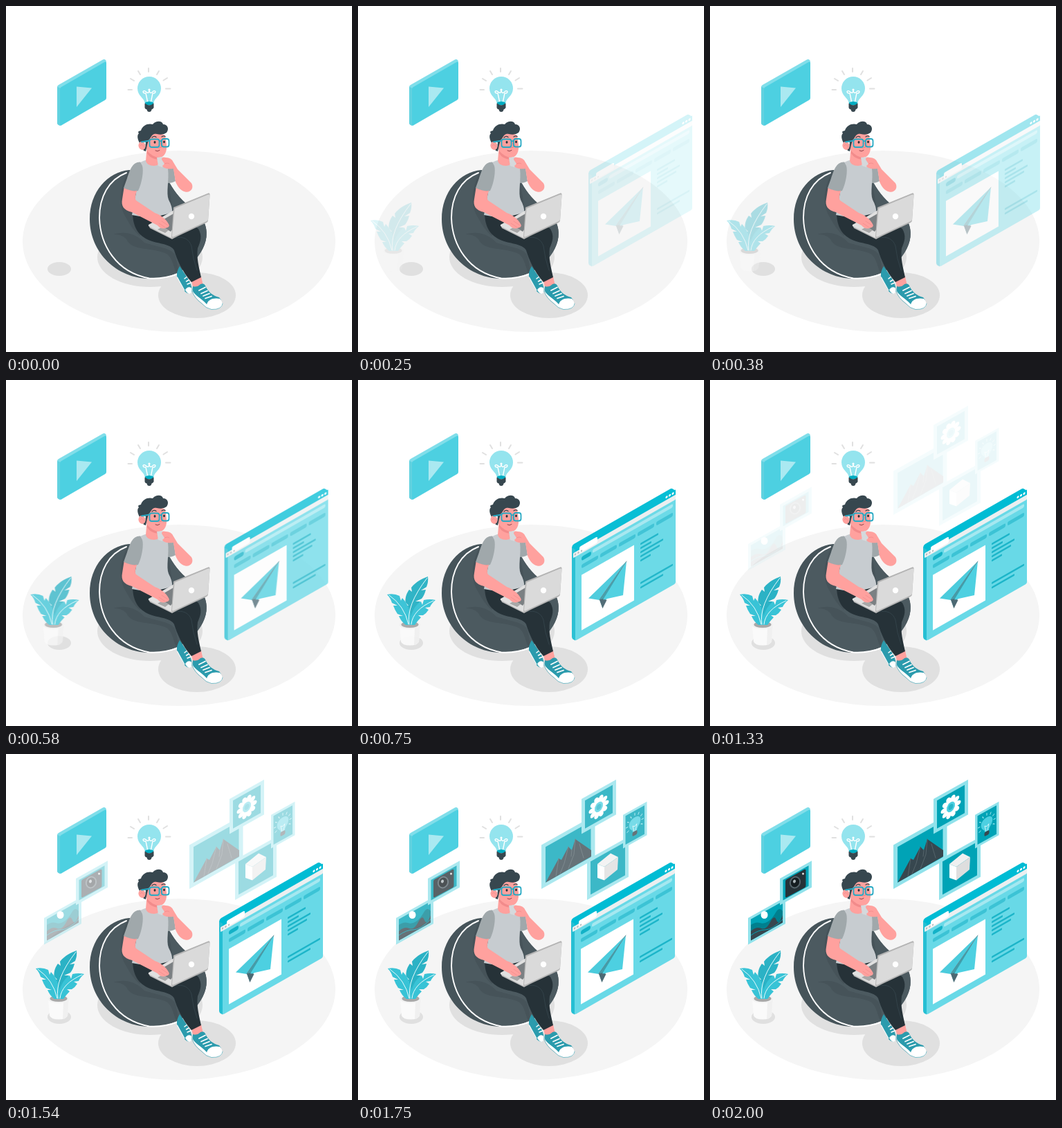
Recreate the animation shown at these times as an HTML page with a canvas. Size 500x500 px, loop 2040 ms.

```html
<!DOCTYPE html>
<html lang="en">
<head>
<meta charset="utf-8">
<title>Idea</title>
<style>
html, body { margin: 0; width: 100%; height: 100%; overflow: hidden; background: #fff; }
canvas { display: block; width: 500px; height: 500px; }
</style>
</head>
<body>
<canvas id="stage"></canvas>
<script>
const SIZE = 500, LOOP = 2040, FPS = 24, ENTER = 1160, TRAVEL = 30;
const ratio = window.devicePixelRatio || 1;
const SLOPE = -0.572;
const teal = '#4dd0e1', dark = '#37474f', ink = '#263238', skin = '#ffa19e';
let g;

function prepare(canvas) {
  canvas.width = canvas.height = SIZE * ratio;
  const ctx = canvas.getContext('2d');
  ctx.scale(ratio, ratio);
  ctx.lineCap = ctx.lineJoin = 'round';
  return ctx;
}
function layer(draw) {
  const c = document.createElement('canvas');
  g = prepare(c);
  draw();
  return c;
}
function fill(color, d) {
  g.fillStyle = color;
  g.fill(new Path2D(d));
}
function line(color, width, d) {
  g.strokeStyle = color;
  g.lineWidth = width;
  g.stroke(new Path2D(d));
}
function oval(color, x, y, rx, ry = rx, turn = 0) {
  g.fillStyle = color;
  g.beginPath();
  g.ellipse(x, y, rx, ry, turn, 0, Math.PI * 2);
  g.fill();
}
function rect(color, x, y, w, h, r = 0) {
  g.fillStyle = color;
  g.beginPath();
  g.roundRect(x, y, w, h, r);
  g.fill();
}
// Draws in a plane leaning up to the right, with its corner at x, y.
function plane(x, y, draw, slope = SLOPE) {
  g.save();
  g.transform(1, slope, 0, 1, x, y);
  draw();
  g.restore();
}
function clipped(d, draw) {
  g.save();
  g.clip(new Path2D(d));
  draw();
  g.restore();
}

function floor() {
  oval('#f5f5f5', 250, 340, 226, 131);
  oval('#e0e0e0', 77, 380, 17, 10);
  oval('#e0e0e0', 208, 363, 76, 43);
  oval('#e0e0e0', 276, 418, 56, 33);
}

function video() {
  fill('#80deea', 'M74 117Q74 115 76 114L140 77.5Q142 76.5 144 78L145 80L79 173L76 172Q74 171 74 169Z');
  fill('#62d2e0', 'M74 117L78 118.500V173L76 172Q74 171 74 169Z');
  fill(teal, 'M78 120Q78 118 80 117L142.500 81Q145 79.500 145 82V133Q145 135 143 136L80 172.500Q78 173.500 78 171Z');
  fill('#aae9f1', 'M102 116.500L124 118.500L102 146Z');
}

function bulb() {
  line('#e0e0e0', 2, 'M176.500 121H182M180 105L185 108M191 94L194 99M206 90V95M221 94L218 99M233 104L227.500 107.500M231 119.500H237.500');
  fill('#94e4ee', 'M200.500 140C200 133 190 130 190 119A17 17 0 0 1 224 119C224 130 214 133 213.500 140Z');
  line('#fff', 1.4, 'M204.500 138L202 126C197 127 197 121 201 123C204 125 206 128 207 122C208 128 211 125 213 123C217 121 217 127 212 126L209.500 138');
  oval('#fff', 207, 121, 1.6);
  fill('#00acc1', 'M201 139.500Q207 136.500 213 139.500V143H201Z');
  fill(dark, 'M200.500 140.500Q207 146 213.500 140.500V147Q212 149 210.500 149.500Q210 153 207 153Q204 153 203.500 149.500Q201 149 200.500 147Z');
}

function seat() {
  fill('#46545a', 'M178 237C147 240 121 268 121 308C121 356 160 394 208 394C252 394 286 363 289.500 334C292 314 281 301 266 290C250 278 242 266 233 250Z');
  fill('#4c5a60', 'M178 238C152 248 135 275 135 307C136 345 158 388 213 394C254 393 286 363 289.500 334C292 314 281 301 266 290C250 278 242 266 233 250Z');
  fill('#465359', 'M176 240C165 262 161 285 173 305C181 320 188 328 193 332L242 300L234 252Z');
  fill('#465359', 'M155 330C172 324 190 330 200 342C222 349 238 350 244 359C247 368 249 378 249 387C243 388 243 365 232 358C210 348 182 355 174 337C169 331 162 330 155 330Z');
  line('#fff', 1.9, 'M174 241C148 251 135 276 135 306C136 345 159 385 207 393.500Q227 395 249 387');
}

function shoes() {
  fill('#2b9bad', 'M251 376L261 391Q268 400 269 412Q265 419 258 412L247 391Q246 384 251 376Z');
  fill('#fff', 'M259 410Q263 404 268 407.500Q270 415 265 416Q261 415 259 410Z');
  line('#fff', 1.1, 'M247.500 392L258 411');
  line('#fff', 1.5, 'M258 394L262 391M260.500 398L265 395.500M262 402L267 400');
  fill(skin, 'M268 397L282 391L285 404L271 409Z');
  fill('#fff', 'M269 411Q272 421 283 429Q289 437 297 438.500Q312 439 313 430L309 424Z');
  line('#2b9bad', .6, 'M269 412Q272 422 283 430Q289 437 297 438.500Q312 439 313 430');
  fill('#2b9bad', 'M270 405Q276 407 281 402Q286 400 288 404C292 413 299 419 308 421Q314 427 308 434Q298 438 290 431C282 422 272 418 269.500 411Z');
  fill('#fff', 'M290 432C291 424 300 421 309 423Q314 428 311 434Q304 438 295 436Z');
  line('#fff', 1.8, 'M279 411L288 406.500M282 415.500L291 411.500M285 419L294 415.500M288 422.500L297 419.500');
}

function legs() {
  fill(ink, 'M183 301C184 322 193 334 211 340C225 344 239 345 243 353C247 366 254 383 268 399L282 392C279 378 275 364 277 350C281 340 284 333 278 322L236 293Z');
  line('#37474f', .8, 'M243 335C256 332 265 337 268 347Q270 365 276 382');
}

function torso() {
  fill('#a0a8ab', 'M230 233L242 233L245 253Q240 256 233 256Z');
  fill('#c7ccd0', 'M194 226Q202 222 207 222Q216 231 226 230L234 235C236 252 231 270 235 280Q241 291 240 298Q212 309 182 302L189 264Z');
  fill('#a0a8ab', 'M194 225.500C183 225 179 237 175 249L170 263Q180 269 191 267C197 254 199 238 197 231Z');
}

function laptop() {
  fill('#bdbdbd', 'M206 317L208 321L240 337L280 314L278 302Z');
  fill('#e0e0e0', 'M206 318Q205 316 208 315L253 289Q256 287 259 289L288 304L240 334Q239 335 237 334Z');
  fill('#7b8083', 'M218 314L249 296L258 300L238 326Z');
  fill('#a8a8a8', 'M219 323L226 319L235 324L230 328Z');
  fill('#b3b3b3', 'M242 291L291 271Q295 269 294.500 273L292 310Q292 312 289 313.500L242 335.500L239 334Z');
  fill('#dadada', 'M243.500 294Q243.500 292.500 245 292L292 272.500Q294.500 272 294.500 274L292 308Q292 310 290 311L242 333.500Q239.800 334.500 240 332Z');
  oval('#fff', 268, 304, 4.2);
}

function nearArm() {
  fill(skin, 'M170.500 263Q180 268 189 267C187 273 186 278 188 281L215 299C222 301 231 307 235.500 316Q237 320 230 321Q224 323 219 317L182 298C170 295 166 289 168 279Z');
  line('#f28f8e', .8, 'M225 311L234 317M221 314L230 320');
}

function head() {
  fill(skin, 'M204 200L202 224Q204 231 214 231Q223 230 222 224L222 216Z');
  fill('#f28b8b', 'M204 209Q211 217 220 219L220 222Q209 221 204 213Z');
  fill(skin, 'M203 190Q218 180 230 187L232 200C233 211 229 218 222 219Q210 218 203 207Z');
  fill(dark, 'M202 210C197 209 198 207 201 205L202 197Q196 194 193 198C190 192 189 187 192 184Q189 181 195 180C197 172 206 169 212 171C217 165 226 166 227 171C234 171 236 178 232 183Q227 187 218 185C211 183 210 190 206 194L204 201Z');
  oval(skin, 196.500, 202, 5, 6, -.2);
  line('#f28b8b', .8, 'M194 202Q196 198 199 203');
  line(dark, 1.3, 'M211 190Q214 187 217 189.500M225 189Q228 187 230 188.500');
  oval(ink, 215, 196.800, 1.5, 1.9);
  oval(ink, 228.500, 196.300, 1.4, 1.9);
  line('#ef7f80', 1, 'M223 197L225 204L221 205');
  line('#8e4048', 1, 'M216 209Q219 211 222 208.500');
  g.strokeStyle = '#26a9c3';
  g.lineWidth = 1.8;
  g.beginPath();
  g.roundRect(207.500, 192.500, 14, 11.500, 3);
  g.roundRect(225, 192, 10.500, 11.500, 3);
  g.moveTo(196, 196.500);
  g.lineTo(207.500, 194.500);
  g.moveTo(221.500, 195.500);
  g.lineTo(225, 195);
  g.stroke();
}

function farArm() {
  fill('#d5d9dc', 'M218 219L226 218L230 225L226 233L220 231Z');
  fill(skin, 'M225 222Q225 217 231 219Q239 219 242 226L248 236L268 256C272 263 267 270 259 268.500C252 267 248 261 245 254L242 235C234 236 228 235 226 231L229 228Z');
  line('#f28b8b', .8, 'M229 228Q234 226 236 228');
}

function scenery() {
  floor();
  video();
  bulb();
  seat();
  shoes();
  legs();
  torso();
  laptop();
  nearArm();
  head();
  farArm();
}

function browser() {
  fill('#00bcd4', 'M308 242Q308 239 311 237L450 157.500Q452 156 454 157.500L458 160V166L313 248L308 246Z');
  fill('#26bfd3', 'M308 242L313 245V376.500L309.500 374.500Q308 373.500 308 371Z');
  plane(313, 241, () => {
    rect('#68d9e7', 0, 1, 145, 135, 2);
    rect('#00bcd4', 0, 0, 145, 8, 1);
    [132, 136.500, 141].forEach(x => oval('#fff', x, 3.700, 1.6));
    rect('#eceff0', -3, 7.500, 148, 7, 1);
    rect('#fff', 6, 3.500, 26, 9, 2);
    [0, 4.500, 9].forEach(x => oval('#b0b6b8', x, 11, 1.2));
    rect('#a5e8f0', 25, 18.500, 116, 5, 2);
    rect('#13b2c7', 9, 19.500, 14, 6, 2.5);
    for (let i = 0; i < 5; i++) rect('#3cc3d5', 9 + 27 * i, 31, 24, 5.500, 2);
    rect('#fff', 9, 46, 76, 80);
    [26, 16, 33, 28, 15].forEach((w, i) => rect('#1cb5c9', 94, 48.500 + 6 * i, w, 2.800, 1));
    rect('#1cb5c9', 94, 105, 47, 2.800, 1);
    rect('#1cb5c9', 94, 111.500, 33, 2.800, 1);
  });
  fill('#4bcbdc', 'M387 262L332 315.500L348 318Z');
  fill('#4dd0e1', 'M387 262L355 317L382 311Z');
  fill('#3f9fac', 'M387 262L348 317.500L352.500 330L355 317Z');
  fill('#4d6973', 'M348 317.500L352.500 330L358.500 318L354 316Z');
  fill('#4dd0e1', 'M387 262L353 317.500L358 317Z');
  line('#64747b', .7, 'M387 262L348 317.500');
}

function plant() {
  fill('#fafafa', 'M61 354L63 378Q65 383.500 76 383.500Q87 383.500 89 378L91.500 354Z');
  fill('#f0f0f0', 'M83 359L91 354L89 378Q87 382 82 383Z');
  oval('#f2f2f2', 76, 354, 15.300, 6);
  oval('#a8a8a8', 76, 353.500, 12.500, 4.600);
  fill('#2bb2c5', 'M73 354C70 341 69 333 69 326L74 326L69.500 321C69 313 72 307 75 303L79 306L78 300C85 291 94 287 102 284Q103 292 100 299L92 304L99 303Q97 311 93 316L84 320L91 320C83 331 80 339 81 354Z');
  fill('#38c3d6', 'M70 354C65 350 62 346 60 341L66 341L58 338Q54 332 52 326L58 326L50 322Q48 315 43 310Q53 308 61 312L63 319L65 315C74 324 79 339 79 354Z');
  fill('#38c3d6', 'M76 354C76 338 83 325 92 320L94 325L96 318Q105 316 113 318Q107 323 105 328L98 329L103 332Q100 337 95 340L88 340L92 343Q87 348 83 354Z');
  line('#e6fafc', 1, 'M75 353Q70 326 101 286M74 353Q68 326 46 311M78 353Q80 332 110 319');
}

// A framed picture; draw gets the frame's own leaning axes.
function card(x, y, w, h, edge, draw) {
  plane(x, y, () => {
    rect('#91e2eb', 0, 0, w, h);
    rect('#00a3b6', edge, edge, w - 2 * edge, h - 2 * edge);
    if (draw) draw();
  }, -.56);
}

function gallery() {
  card(331, 153, 60, 58, 5);
  fill('#fff', 'M346 159L356 163V182.500L346 179Z');
  fill('#f0f0f0', 'M346 159L365 143.500L376 149L356 163Z');
  fill('#dedede', 'M356 163L376 149L375 167L356 182.500Z');

  card(265, 131.500, 77.500, 63.500, 6);
  clipped('M271 134L337 97V148L271 186Z', () => {
    fill(dark, 'M271 186L290 151L294 153L304 134L309 139L314 123L337 139V150Z');
    line('#59686f', .9, 'M290 151L286 177M304 134L298 158L292 173M314 123L312 145L304 166M309 139L308 148M320 130L326 150');
  });

  card(323, 65, 50, 50.500, 5, () => {
    for (let i = 0; i < 10; i++) {
      const a = i * Math.PI / 5;
      oval('#fff', 25 + 9.500 * Math.cos(a), 25.500 + 11 * Math.sin(a), 5, 3.500, a);
    }
    oval('#4dd0e1', 25, 25.500, 6, 7);
    oval('#26b5c8', 25, 25.500, 3.500, 4);
  });

  card(383, 88, 34.500, 48.500, 3.500, () => {
    for (let i = 0; i < 9; i++) {
      const a = Math.PI * (.85 + i * .1625), c = Math.cos(a), s = Math.sin(a);
      line('#a8e9f0', 1, `M${17 + 10 * c} ${22 + 12 * s}L${17 + 12.500 * c} ${22 + 15 * s}`);
    }
    fill('#4dd0e1', 'M14 33Q14 30 10 26C6 17 12 13 17 13S28 17 24 26Q20 30 20 33Z');
    line('#d7f5f8', .8, 'M16 33L14 24L17 26L20 24L18 33');
    rect(dark, 13.500, 33, 7, 6, 2);
  });

  card(55, 237, 54, 38.500, 4);
  clipped('M59 238.500L105 212V243.500L59 269.500Z', () => {
    fill('#00808f', 'M59 247Q66 242 72 244T84 242T95 229T105 227V244L59 270Z');
    fill(dark, 'M59 256Q67 249 74 252Q81 255 87 243T96 240T105 233V244L59 270Z');
    line('#00a3b6', 1, 'M59 262Q70 254 80 254T105 239');
  });
  oval('#fff', 78.500, 232.500, 5, 5.500);

  card(101, 180, 46, 38.500, 4.500);
  fill(ink, 'M109 184Q109 182 111 181L136 167Q138.500 166 138.500 168V190Q138.500 192 137 193L111 207Q109 208 109 206Z');
  oval('#56656c', 123, 185.500, 8, 9, .4);
  oval('#151d21', 123, 185.500, 6, 7, .4);
  oval('#aab4b8', 122, 184, 2, 2.500, .4);
  oval('#e0e0e0', 134.500, 173, 1.5);
}

function bezier(x) {
  if (x <= 0) return 0;
  if (x >= 1) return 1;
  const at = (u, a, b) => 3 * u * (1 - u) ** 2 * a + 3 * u * u * (1 - u) * b + u ** 3;
  let lo = 0, hi = 1;
  for (let i = 0; i < 30; i++) {
    const u = (lo + hi) / 2;
    if (at(u, .36, .5) < x) lo = u; else hi = u;
  }
  return at(lo, -.01, 1.38);
}

const scene = layer(scenery);
const page = layer(browser);
const pot = layer(plant);
const cards = layer(gallery);
const out = prepare(document.getElementById('stage'));

function show(img, alpha = 1, dx = 0) {
  out.globalAlpha = Math.max(0, Math.min(1, alpha));
  out.drawImage(img, dx, 0, SIZE, SIZE);
}
// Progress of an entrance; too faint to show in its first steps.
function entrance(time) {
  return time < 160 ? 0 : bezier(time / ENTER);
}

const start = performance.now();
function frame(now) {
  const t = Math.max(0, now - start) % LOOP;
  const time = Math.floor(t * FPS / 1000 + .1) * 1000 / FPS;
  const slide = entrance(time), fade = entrance(time - ENTER);
  const shift = TRAVEL * (1 - slide);
  out.globalAlpha = 1;
  out.fillStyle = '#fff';
  out.fillRect(0, 0, SIZE, SIZE);
  show(scene);
  show(page, slide, shift);
  show(pot, slide, -shift);
  show(cards, fade);
  requestAnimationFrame(frame);
}
frame(start);
</script>
</body>
</html>
```
